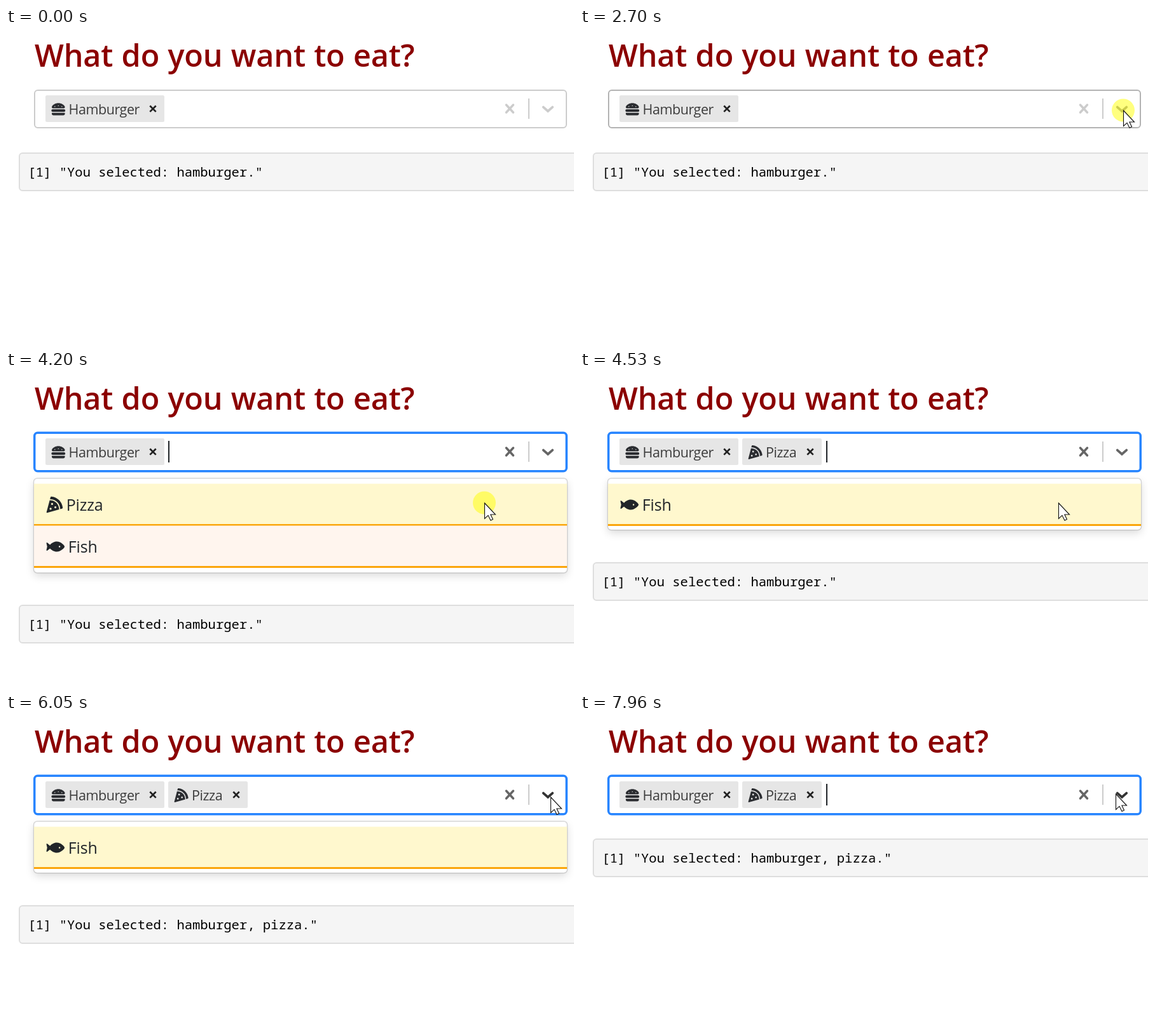
Write an HTML page with a canvas that moves like this. It is 893 px wide and 496 px high and loops after 8 s.

```html
<!DOCTYPE html>
<html lang="en">
<head>
<meta charset="utf-8">
<title>What do you want to eat?</title>
<style>
  html, body { margin: 0; width: 100%; height: 100%; overflow: hidden; background: #fff; }
  canvas { display: block; }
</style>
</head>
<body>
<canvas id="stage" width="893" height="496"></canvas>
<script>
const ctx = document.getElementById('stage').getContext('2d');
const LOOP = 8000, STEP = 70, BLINK = 520;
const SANS = '"Open Sans", "Noto Sans", sans-serif';
const MONO = '"Noto Sans Mono", "DejaVu Sans Mono", monospace';
const INK = '#212529';

const OPEN = 2770, PICK = 4530, ECHO = 4720, CLOSE = 6380;
const PRESSES = [[2630, 2970], [4200, 4530], [6310, 6580]];

// Pointer legs: [time, x, y]; the pointer rests between legs.
const LEGS = [
  [[860, 731, 429], [1070, 818, 272], [1210, 869.5, 180], [1490, 872, 164]],
  [[1880, 872, 164], [2300, 854.5, 130]],
  [[3160, 854.5, 130], [3370, 835, 172], [3720, 772, 221], [4000, 752.5, 208]],
  [[4650, 752.5, 208], [5140, 798.5, 162], [5280, 838, 132], [5630, 874, 128], [6050, 856.5, 131]],
  [[6770, 856.5, 131], [7050, 858, 168], [7300, 815, 171], [7610, 793, 150], [7960, 842.5, 126]]
];

const ICONS = {
  burger: new Path2D('M464 256H48a48 48 0 0 0 0 96h416a48 48 0 0 0 0-96z' +
    'M480 384H32a16 16 0 0 0-16 16v16a64 64 0 0 0 64 64h352a64 64 0 0 0 64-64v-16a16 16 0 0 0-16-16z' +
    'M59 224h394c35 0 55-44 35-76C448 83 360 32 256 32S64 83 24 148C4 180 24 224 59 224z' +
    'M112 160a16 16 0 1 0 32 0a16 16 0 1 0-32 0z' +
    'M240 128a16 16 0 1 0 32 0a16 16 0 1 0-32 0z' +
    'M368 160a16 16 0 1 0 32 0a16 16 0 1 0-32 0z'),
  pizza: new Path2D('M159 0c-16-1.500-31 8.500-35 24l-15 56.500c188 5.500 314.500 130.500 322.500 317l57-16c16-4 25-20 23.500-36C491 165 341 17 159 0z' +
    'M100 112L.5 492a16 16 0 0 0 20 19.500l379-105C395 231.500 276.500 114 100 112z' +
    'M96 384a32 32 0 1 0 64 0a32 32 0 1 0-64 0z' +
    'M144 232a32 32 0 1 0 64 0a32 32 0 1 0-64 0z' +
    'M248 336a32 32 0 1 0 64 0a32 32 0 1 0-64 0z'),
  fish: new Path2D('M327 96c-90 0-168.500 55-212 101.500L27.500 131.500c-12-9-30 .6-27 15L24.500 256L.5 365.500c-3 14 15 24 27 15L115 314.500C158.500 361 237 416 327 416C464.500 416 576 288 576 256S464.500 96 327 96z' +
    'M390.500 256a24 24 0 1 0 48 0a24 24 0 1 0-48 0z')
};
const ARROW = new Path2D('M0 0V24.500L5.500 19.300L9.500 27.200L13 25.600L9.400 18H17Z');

function text(str, x, y, font, color, spacing = 0, wordGap = 0) {
  ctx.font = font;
  ctx.fillStyle = color;
  ctx.letterSpacing = spacing + 'px';
  ctx.wordSpacing = wordGap + 'px';
  ctx.fillText(str, x, y);
}

function box(x, y, w, h, r) {
  ctx.beginPath();
  ctx.roundRect(x, y, w, h, r);
}

function fillRect(x, y, w, h, color) {
  ctx.fillStyle = color;
  ctx.fillRect(x, y, w, h);
}

function icon(name, x, y, scale, color = INK) {
  ctx.save();
  ctx.translate(x, y);
  ctx.scale(scale, scale);
  ctx.fillStyle = color;
  ctx.fill(ICONS[name], 'evenodd');
  ctx.restore();
}

function strokeLine(points, width, color, cap = 'round') {
  ctx.beginPath();
  points.forEach(([x, y]) => ctx.lineTo(x, y));
  ctx.lineWidth = width;
  ctx.lineCap = cap;
  ctx.lineJoin = 'miter';
  ctx.strokeStyle = color;
  ctx.stroke();
}

function cross(x, y, rx, ry, width, color, cap) {
  strokeLine([[x - rx, y - ry], [x + rx, y + ry]], width, color, cap);
  strokeLine([[x - rx, y + ry], [x + rx, y - ry]], width, color, cap);
}

function pointerAt(time) {
  const leg = LEGS.filter(l => l[0][0] <= time).pop();
  if (!leg) return null;
  const start = leg[0][0], end = leg[leg.length - 1][0];
  const t = Math.min(end, start + Math.floor((time - start) / STEP) * STEP);
  const i = Math.max(1, leg.findIndex(p => p[0] >= t));
  const [t0, x0, y0] = leg[i - 1], [t1, x1, y1] = leg[i];
  const k = (t - t0) / (t1 - t0);
  return { x: x0 + (x1 - x0) * k, y: y0 + (y1 - y0) * k };
}

function caretOn(t) {
  if (t < OPEN) return false;
  if (t < PICK) return t < OPEN + BLINK || t >= OPEN + 2 * BLINK;
  return Math.floor((t - PICK + 40) / BLINK) % 2 === 0;
}

function tag(x, w, label, labelX, name, iconX) {
  box(x, 106, w, 42, 2.5);
  ctx.fillStyle = '#e6e6e6';
  ctx.fill();
  icon(name, iconX, 116.9, 0.043, '#2b2d31');
  text(label, labelX, 136, '21.5px ' + SANS, '#3c3c3c', -0.45);
  cross(x + w - 18, 127.2, 4.7, 4.7, 2.7, '#222', 'butt');
}

function control(t, mouse) {
  const focused = t >= OPEN;
  const within = (x0, x1) => mouse && mouse.x > x0 && mouse.x < x1 && mouse.y > 98 && mouse.y < 156;
  const shade = hover => focused ? (hover ? '#333' : '#666') : (hover ? '#999' : '#ccc');

  if (focused) {
    box(44.75, 97.25, 836.5, 60.5, 5);
    ctx.lineWidth = 3.5;
    ctx.strokeStyle = '#2684ff';
  } else {
    box(45, 98, 836, 59, 5);
    ctx.lineWidth = 2;
    ctx.strokeStyle = within(44, 882) ? '#b3b3b3' : '#ccc';
  }
  ctx.stroke();

  tag(62, 187, 'Hamburger', 98.5, 'burger', 71.3);
  if (t >= PICK) tag(255, 125, 'Pizza', 292, 'pizza', 264.6);
  if (caretOn(t)) fillRect(t < PICK ? 255 : 387, 110, 2, 34, INK);

  cross(792, 127, 5.5, 6, 3.5, shade(within(775, 811)));
  fillRect(821, 111, 2, 32, '#ccc');
  strokeLine([[844.8, 124.6], [852, 131], [859.2, 124.6]], 3.8, shade(within(833, 874)));
}

function option(y, label, x, name, iconX, iconY, active) {
  fillRect(44, y, 838, 63.5, active ? '#fff8ce' : '#fff5ee');
  fillRect(44, y + 63.5, 838, 3, '#fba60c');
  icon(name, iconX, y + iconY, 0.0498);
  text(label, x, y + 42.5, '25px ' + SANS, INK, -0.15);
}

function menu(t) {
  const h = t < PICK ? 148 : 80.5;
  ctx.save();
  ctx.shadowColor = 'rgba(0,0,0,.15)';
  ctx.shadowBlur = 14;
  ctx.shadowOffsetY = 5;
  box(44, 169.5, 838, h, 5);
  ctx.fillStyle = '#fff';
  ctx.fill();
  ctx.restore();
  box(43.5, 169, 839, h + 1, 5.5);
  ctx.lineWidth = 1.5;
  ctx.strokeStyle = 'rgba(0,0,0,.14)';
  ctx.stroke();

  const fishY = t < PICK ? 243.5 : 177.5;
  if (t < PICK) option(177.5, 'Pizza', 94.7, 'pizza', 63.7, 20.3, true);
  option(fishY, 'Fish', 97.8, 'fish', 63.5, 20.3, t >= PICK);
}

function output(t) {
  const open = t >= OPEN && t < CLOSE;
  const y = !open ? 197 : t < PICK ? 369 : 302;
  box(21, y, 900, 59, 5);
  ctx.fillStyle = '#f5f5f5';
  ctx.fill();
  ctx.lineWidth = 2;
  ctx.strokeStyle = '#dedede';
  ctx.stroke();
  const picks = t < ECHO ? 'hamburger' : 'hamburger, pizza';
  text(`[1] "You selected: ${picks}."`, 34.5, y + 37, '20.53px ' + MONO, '#000');
}

function pointer(t, { x, y }) {
  if (PRESSES.some(([from, to]) => t >= from && t < to)) {
    ctx.beginPath();
    ctx.arc(x - 0.5, y - 0.5, 18, 0, 2 * Math.PI);
    ctx.fillStyle = 'rgba(255,255,0,.5)';
    ctx.fill();
  }
  ctx.save();
  ctx.translate(x, y);
  ctx.fillStyle = '#fff';
  ctx.fill(ARROW);
  ctx.lineWidth = 1.1;
  ctx.strokeStyle = '#111';
  ctx.stroke(ARROW);
  ctx.restore();
}

function draw(t) {
  const mouse = pointerAt(t);
  fillRect(0, 0, 893, 496, '#fff');
  text('What do you want to eat?', 45, 61, '600 48.5px ' + SANS, '#8b0000', -0.15, 0.9);
  control(t, mouse);
  output(t);
  if (t >= OPEN && t < CLOSE) menu(t);
  if (mouse) pointer(t, mouse);
}

const begin = performance.now();
function tick() {
  draw((performance.now() - begin) % LOOP);
  requestAnimationFrame(tick);
}
tick();
</script>
</body>
</html>
```
